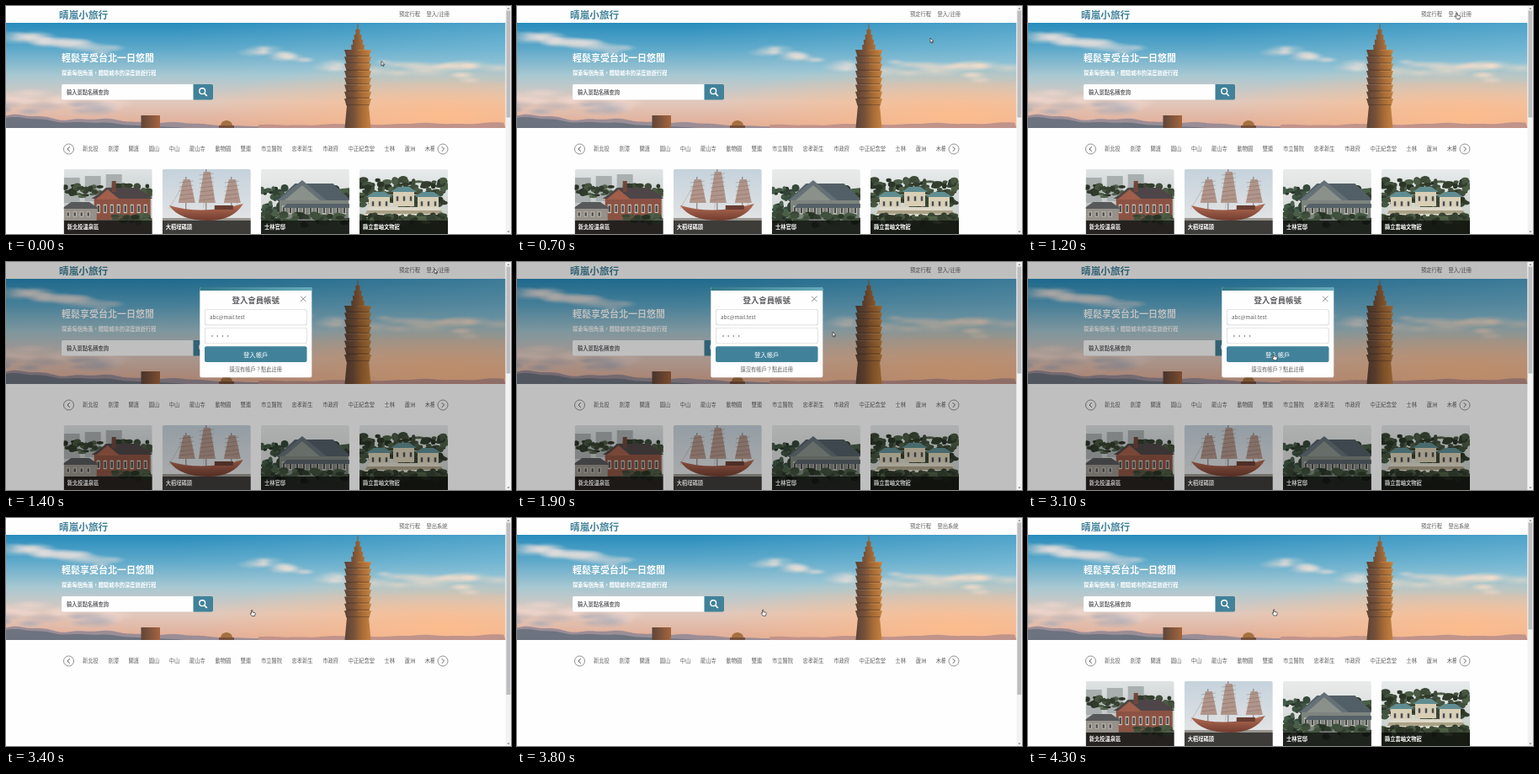
An HTML page with a canvas for the animation above (4400 ms loop, 600x271 px).

```html
<!DOCTYPE html>
<html lang="zh-Hant">
<head>
<meta charset="utf-8">
<title>一日遊</title>
<style>
html, body { margin: 0; width: 100%; height: 100%; overflow: hidden; background: #fefefe; }
canvas { display: block; width: 600px; height: 271px; }
</style>
</head>
<body>
<canvas id="stage"></canvas>
<script>
const W = 600, H = 271, PAGE = 593.6;
const LOOP = 4400, STEP = 100;
const MODAL_AT = 1400, RELOAD_AT = 3200, CARDS_AT = 3900;
const PAPER = '#fefefe', TEAL = '#41829a', INK = '#5c5c60';
const SIZE = 6.25;
const FONT = '"Noto Sans CJK TC", "Noto Sans CJK", "Noto Sans", sans-serif';

const canvas = document.getElementById('stage');
const c = canvas.getContext('2d');
const dpr = window.devicePixelRatio || 1;
canvas.width = W * dpr;
canvas.height = H * dpr;

// ---------- helpers ----------
function rect(color, x, y, w, h) {
  c.fillStyle = color;
  c.fillRect(x, y, w, h);
}

function rounded(color, x, y, w, h, r = 2) {
  c.fillStyle = color;
  c.beginPath();
  c.roundRect(x, y, w, h, r);
  c.fill();
}

function ellipse(color, x, y, rx, ry = rx) {
  c.fillStyle = color;
  c.beginPath();
  c.ellipse(x, y, rx, ry, 0, 0, Math.PI * 2);
  c.fill();
}

function ring(color, width, x, y, r) {
  c.strokeStyle = color;
  c.lineWidth = width;
  c.beginPath();
  c.arc(x, y, r, 0, Math.PI * 2);
  c.stroke();
}

function line(color, width, ...p) {
  c.strokeStyle = color;
  c.lineWidth = width;
  c.beginPath();
  for (let i = 0; i < p.length; i += 2) c.lineTo(p[i], p[i + 1]);
  c.stroke();
}

// symmetric block; a top width of 0 gives a triangle
function taper(color, mid, y, h, top, bottom) {
  c.fillStyle = color;
  c.beginPath();
  c.moveTo(mid - top / 2, y);
  c.lineTo(mid + top / 2, y);
  c.lineTo(mid + bottom / 2, y + h);
  c.lineTo(mid - bottom / 2, y + h);
  c.fill();
}

function shade(x0, y0, x1, y1, ...colors) {
  const g = c.createLinearGradient(x0, y0, x1, y1);
  colors.forEach((col, i) => g.addColorStop(i / (colors.length - 1), col));
  return g;
}

function puff(rgb, alpha, x, y, rx, ry) {
  c.save();
  c.translate(x, y);
  c.scale(rx, ry);
  const g = c.createRadialGradient(0, 0, 0, 0, 0, 1);
  g.addColorStop(0, `rgba(${rgb},${alpha})`);
  g.addColorStop(1, `rgba(${rgb},0)`);
  rect(g, -1, -1, 2, 2);
  c.restore();
}

// y is the optical middle of the line
function text(str, x, y, size, color, weight = 500, align = 'left') {
  c.font = `${weight} ${size}px ${FONT}`;
  c.textAlign = align;
  c.fillStyle = color;
  c.fillText(str, x, y + size * 0.375);
}

function random(seed) {
  return () => (seed = (seed * 16807) % 2147483647) / 2147483647;
}

// ---------- hero ----------
function clouds(seed, n, rgb, x, y, w, h, slope = 0) {
  const rnd = random(seed);
  for (let i = 0; i < n; i++) {
    const u = rnd(), size = 8 + rnd() * w / 6;
    puff(rgb, 0.45, x + u * w, y + u * slope + rnd() * h, size, 2 + size / 6);
  }
}

function ridge(color, x0, x1, left, right) {
  c.fillStyle = color;
  c.beginPath();
  c.moveTo(x0, 145);
  for (let x = x0; x <= x1; x += 3) {
    const u = (x - x0) / (x1 - x0);
    const wave = 0.85 + 0.12 * Math.sin(x / 15) + 0.06 * Math.sin(x / 6);
    c.lineTo(x, 145 - (left + (right - left) * u) * wave);
  }
  c.lineTo(x1, 145);
  c.fill();
}

function tower() {
  const mid = 418, lit = shade(402, 0, 434, 0, '#5b4335', '#755039', '#a96c36', '#c48341');
  taper(lit, mid, 21, 8, 0.8, 1.8);
  for (let i = 0; i < 4; i++) taper(lit, mid, 28 + i * 6, 6.2, 5.5 + i * 3.4, 4.8 + i * 3.4);
  for (let i = 0; i < 8; i++) {
    const y = 52 + i * 8.3;
    taper(lit, mid, y, 8.4, 32, 27);
    rect('rgba(50,33,28,.35)', mid - 13.5, y + 6.9, 27, 1.4);
    rect('rgba(230,165,88,.4)', mid, y, 15.5, 0.8);
  }
  taper(lit, mid, 118, 27, 26, 31);
}

function sky() {
  rect(shade(0, 20, 0, 145, '#288cbc', '#5ea9ca', '#a8c8d2', '#e1c8bc', '#e2ab94'), 0, 20, PAGE, 125);
  rect(shade(200, 0, PAGE, 0, 'rgba(150,205,226,0)', 'rgba(150,205,226,.35)'), 0, 20, PAGE, 70);
  puff('255,188,138', 0.9, 520, 130, 290, 65);
  clouds(5, 26, '235,224,220', -10, 27, 150, 9, 24);
  clouds(11, 22, '240,214,205', -10, 101, 140, 14, 9);
  clouds(19, 14, '165,168,182', -10, 116, 130, 10);
  clouds(29, 18, '242,226,216', 295, 48, 105, 8, 20);
  clouds(37, 18, '255,225,203', 435, 58, 155, 20, 14);
}

function hero() {
  c.save();
  c.beginPath();
  c.rect(0, 20, PAGE, 125);
  c.clip();
  sky();
  ridge('#9b8d96', 0, 300, 17, 2);
  ridge('#6d737f', 0, 215, 14, 0);
  ridge('#c0938b', 300, PAGE, 4, 7);
  rect(shade(160, 0, 184, 0, '#5d4439', '#a8673e'), 160.5, 130, 22.5, 15);
  ellipse('#a4703f', 262, 142, 7, 6);
  rect('#75513f', 253, 142, 18, 3);
  tower();
  c.restore();

  text('輕鬆享受台北一日悠閒', 66, 61.5, 11, '#fff', 700);
  text('探索每個角落，體驗城市的深度旅遊行程', 66, 79.5, SIZE, '#fff', 700);
  rounded(PAPER, 66, 93, 157, 18.5, [2, 0, 0, 2]);
  rounded(TEAL, 222.5, 93, 23.5, 18.5, [0, 2, 2, 0]);
  text('輸入景點名稱查詢', 72, 102.3, SIZE, '#66666a', 700);
  ring('#fff', 1.4, 233.2, 101.2, 3.4);
  line('#fff', 1.7, 235.7, 103.8, 238.8, 107);
}

// ---------- station bar ----------
const STATIONS = ['新北投', '劍潭', '關渡', '圓山', '中山', '龍山寺', '動物園', '雙連',
  '市立醫院', '忠孝新生', '市政府', '中正紀念堂', '士林', '蘆洲', '木柵'];

function stations() {
  c.save();
  c.beginPath();
  c.rect(85, 160, 424, 20);
  c.clip();
  let x = 91;
  for (const name of STATIONS) {
    text(name, x, 170, SIZE, INK);
    x += name.length * SIZE + 11.65;
  }
  c.restore();
  for (const [cx, dir] of [[74.5, -1], [519, 1]]) {
    ring('#77777b', 0.8, cx, 170, 6);
    line(INK, 1, cx - dir * 1.3, 167.2, cx + dir * 1.5, 170, cx - dir * 1.3, 172.8);
  }
}

// ---------- cards: simple scenes in a 105 x 77 box ----------
function backdrop(top, bottom, ground) {
  rect(shade(0, 0, 0, 60, top, bottom), 0, 0, 105, 77);
  rect(ground, 0, 58, 105, 19);
}

function foliage(seed, n, x, y, w, h, hue = 100) {
  const rnd = random(seed);
  for (let i = 0; i < n; i++) {
    ellipse(`hsl(${hue} 14% ${17 + rnd() * 17}%)`, x + rnd() * w, y + rnd() * h,
      2 + rnd() * 4, 1.5 + rnd() * 3);
  }
}

function house(wall, roof, x, y, w, h, pitch) {
  rect(wall, x, y, w, h);
  taper(roof, x + w / 2, y - pitch, pitch + 1, w * 0.55, w + 6);
  for (let k = x + 3; k < x + w - 4; k += 8) {
    rect('#d0cbc0', k, y + h * 0.3, 4, h * 0.4);
    rect('#4b4c4c', k + 0.8, y + h * 0.35, 2.4, h * 0.3);
  }
}

function brickHouse() {
  backdrop('#dfe3e4', '#b9c0be', '#5c544b');
  for (let i = 0; i < 3; i++) rect('#a9afae', i * 25, 10 - i * 2, 19, 30);
  foliage(17, 60, 0, 19, 105, 14);
  house('#8c5243', '#4d4547', 36, 34, 67, 26, 12);
  taper('#a15e4b', 52, 24, 12, 0, 29);
  rect('#70473d', 57, 14, 5, 13);
  house('#96918a', '#57585a', 0, 46, 39, 15, 7);
  foliage(7, 22, 54, 55, 50, 8);
}

function sailBoat() {
  backdrop('#c5d2dc', '#e2e3e4', '#99968f');
  [28, 52, 82].forEach((x, i) => {
    const top = 12 - (i % 2) * 9, h = 40 - top;
    line('#655651', 0.8, x, top - 3, x, 51);
    taper('#b1958a', x + 1, top, h, 8, 20);
    for (let y = top + 4; y < 40; y += 5) line('rgba(105,76,68,.6)', 0.5, x - 8, y, x + 9, y - 2);
    line('#96928f', 0.4, x, top, 8 + i * 41, 47);
  });
  c.fillStyle = shade(0, 44, 0, 61, '#ad6750', '#713c30');
  c.beginPath();
  c.moveTo(8, 43);
  c.quadraticCurveTo(48, 55, 96, 41);
  c.quadraticCurveTo(84, 61, 55, 61);
  c.quadraticCurveTo(20, 61, 8, 43);
  c.fill();
  rect('#683e33', 62, 43, 22, 5);
}

function slateHouse() {
  backdrop('#e9ebeb', '#d2d6d4', '#4d594b');
  foliage(41, 42, 0, 22, 30, 35, 130);
  foliage(43, 14, 85, 22, 20, 18, 110);
  house('#7d847e', '#535f66', 22, 36, 82, 25, 19);
  taper('#657177', 49, 13, 24, 0, 58);
  taper('#89918a', 49, 19, 18, 0, 42);
  taper('#566168', 68, 41, 5, 74, 85);
  foliage(47, 48, 0, 53, 105, 14, 110);
}

function palace() {
  backdrop('#e8ebec', '#c7cec9', '#37442f');
  foliage(61, 150, 0, 12, 105, 32, 105);
  for (let i = 0; i < 3; i++) {
    const y = 32 - (i % 2) * 6, x = 11 + i * 29;
    house('#d8cfb5', '#608d91', x, y, 25, 18, 5);
  }
  for (let i = 0; i < 3; i++) taper(i % 2 ? '#aaa187' : '#ded9c9', 53, 45 + i * 4, 4.2, 83 + i * 5, 88 + i * 5);
  foliage(67, 75, 0, 55, 105, 9, 100);
}

const CARDS = [['新北投溫泉區', brickHouse], ['大稻埕碼頭', sailBoat],
  ['士林官邸', slateHouse], ['縣立雲岫文物館', palace]];

function cards() {
  CARDS.forEach(([name, paint], i) => {
    c.save();
    c.translate(68.7 + i * 117.1, 194);
    c.beginPath();
    c.roundRect(0, 0, 105, 79, 2);
    c.clip();
    paint();
    rect('rgba(0,0,0,.6)', 0, 61, 105, 16);
    text(name, 4, 69, SIZE, '#fff', 700);
    c.restore();
  });
}

// ---------- page parts ----------
function header(loggedIn) {
  text('晴嵐小旅行', 63, 10.2, 11.65, TEAL, 700);
  text('預定行程', 467, 10, SIZE, INK);
  text(loggedIn ? '登出系統' : '登入/註冊', 499.5, 10, SIZE, INK);
}

function scrollbar(end) {
  rect('#f2f2f3', PAGE, 0, W - PAGE, H);
  rect('#bdbdc0', 594.4, 5.5, 4.8, end - 5.5);
  taper('#77777a', 596.9, 2, 1.8, 0, 3.2);
  taper('#77777a', 596.9, 267.5, 1.8, 3.2, 0);
}

function field(y) {
  rounded('#cfcfd2', 236, y, 121.6, 19);
  rounded('#fff', 236.6, y + 0.6, 120.4, 17.8);
}

function modal() {
  const mid = 296.7;
  rect('rgba(0,0,0,.25)', 0, 0, PAGE, H);
  rounded(PAPER, 230.3, 30, 133, 107.3);
  rounded(shade(230, 0, 364, 0, '#337788', '#66aabb'), 230.3, 30, 133, 4, [2, 2, 0, 0]);
  text('登入會員帳號', mid, 45.3, 9.4, INK, 700, 'center');
  for (const d of [-3.2, 3.2]) line('#737377', 0.8, 353.2 - d, 40.6, 353.2 + d, 47);
  field(56.2);
  field(78);
  text('abc@mail.test', 242, 65.8, SIZE, INK, 400);
  for (let i = 0; i < 4; i++) ellipse(INK, 245 + i * 6.2, 88, 0.8);
  rounded(TEAL, 236, 100.3, 121.5, 18.7);
  text('登入帳戶', mid, 110, 7.4, '#fff', 500, 'center');
  text('還沒有帳戶？點此註冊', mid, 127.8, SIZE, INK, 500, 'center');
}

// ---------- pointer ----------
const PATH = [[0, 446, 65.5], [200, 448, 64], [700, 491, 38], [1200, 509, 8], [MODAL_AT, 509, 8],
  [1900, 375, 83], [2500, 291.5, 109.5], [LOOP, 291.5, 108.5]];
const ARROW = new Path2D('M0 0V5.6L1.3 4.5L2.1 6.3L3 5.9L2.2 4.1H3.9Z');
const HAND = new Path2D('M0 .6Q.7-.2 1.3.6V3L4 3.5Q4.9 3.7 4.7 4.7L4 7.5H.6L-1.5 4.6Q-1.2 3.7 0 4.6Z');

function pointerAt(t) {
  const i = PATH.findIndex(k => k[0] > t);
  const [t0, x0, y0] = PATH[i - 1], [t1, x1, y1] = PATH[i];
  const u = (t - t0) / (t1 - t0), e = u * u * (3 - 2 * u);
  return [x0 + (x1 - x0) * e, y0 + (y1 - y0) * e];
}

function pointer(t) {
  const [x, y] = pointerAt(t);
  const onLink = t < MODAL_AT && x > 499 && y < 14;
  const onButton = t >= MODAL_AT && x < 357 && y > 100;
  const shape = onLink || onButton ? HAND : ARROW;
  c.save();
  c.translate(x, y);
  c.lineJoin = 'round';
  c.lineWidth = 0.7;
  c.strokeStyle = '#29292c';
  c.fillStyle = '#fff';
  c.fill(shape);
  c.stroke(shape);
  c.restore();
}

// ---------- timeline ----------
function draw(t) {
  const reloaded = t >= RELOAD_AT;
  const loaded = !reloaded || t >= CARDS_AT;
  c.setTransform(dpr, 0, 0, dpr, 0, 0);
  rect(PAPER, 0, 0, W, H);
  header(reloaded);
  hero();
  stations();
  if (loaded) cards();
  if (t >= MODAL_AT && !reloaded) modal();
  scrollbar(loaded ? 132.5 : 210);
  pointer(t);
}

function frame() {
  const t = performance.now() % LOOP;
  draw(Math.floor(t / STEP) * STEP);
  requestAnimationFrame(frame);
}
frame();
</script>
</body>
</html>
```
